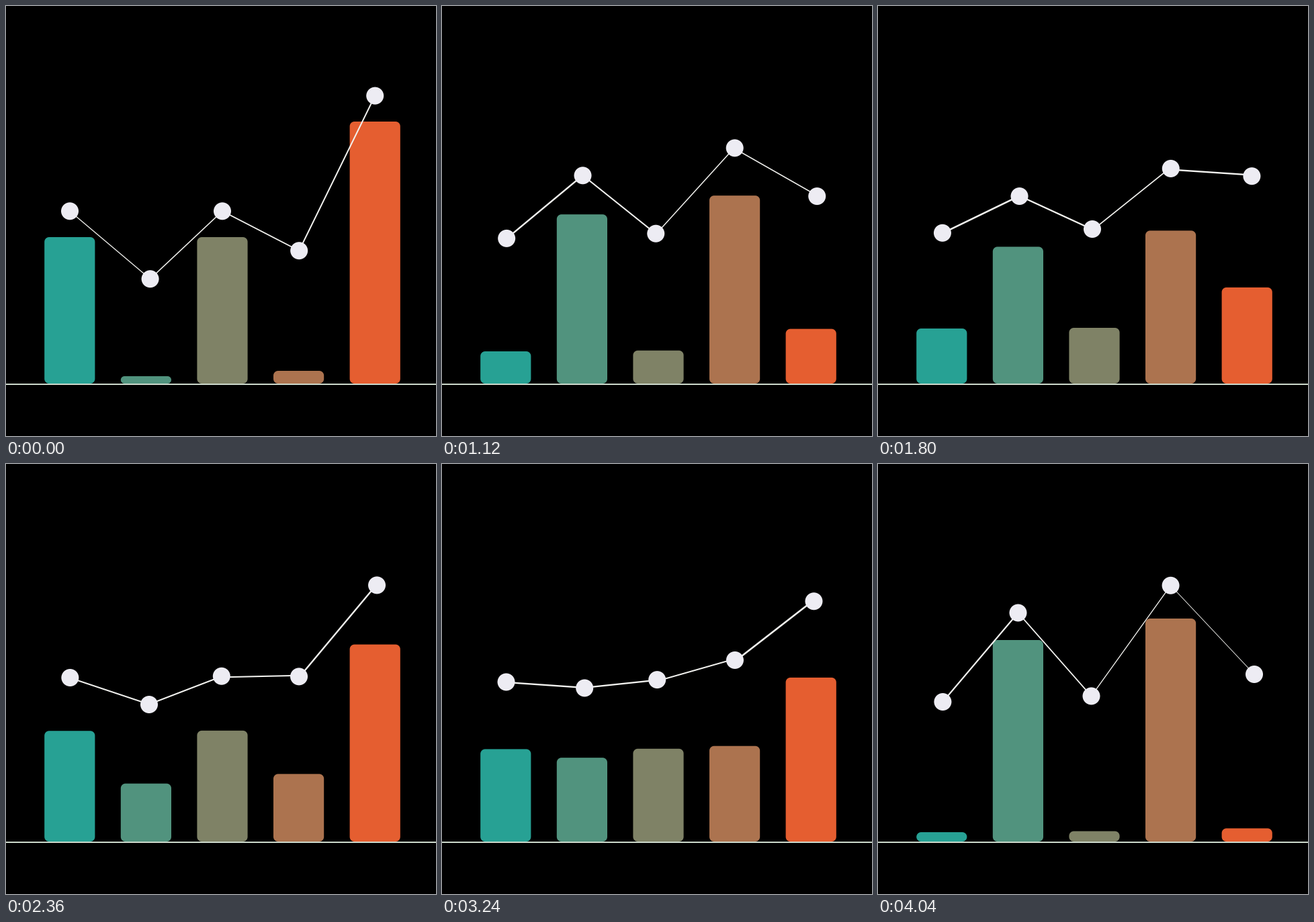
A matplotlib script that plays this animation: 640x640 px, repeating every 4140 ms.

```python
import numpy as np
import matplotlib.pyplot as plt
from matplotlib.animation import FuncAnimation
from matplotlib.patches import Circle, Polygon, Rectangle

SIZE, DPI = 640, 100
STEP_MS, FRAMES = 20, 207
FLOOR = 562
BAR_LEFT, BAR_PITCH, BAR_WIDTH, CORNER = 57.2, 113.6, 75.2, 7
DOT_RADIUS, LINK_GAP = 13, 11
BAR_COLORS = ["#27a194", "#51937e", "#7f8266", "#ac734f", "#e55e30"]

# Two key poses; everything moves in a straight line between them.
HEIGHTS = np.array([[218, 11, 218, 19, 390],
                    [14, 300, 15.5, 332, 19.7]])
DOTS = np.array([
    [(95, 305.3), (214.6, 406.2), (322, 305.3), (436.2, 364.2), (549.2, 133.6)],
    [(96.4, 354), (208.5, 221.5), (317.5, 345.4), (435.6, 180.8), (560, 313)],
])
# Link weight runs from thin to full in one pose, full to thin in the other.
WEIGHTS = np.linspace((1.3, 2.2), (2.0, 0.9), 4).T


def progress(i):
    """Linear swing: there, slightly slower back, there again, short rest."""
    return np.interp(i, [1, 67, 136, 202], [0, 1, 0, 1])


def blend(poses, p):
    return poses[0] + (poses[1] - poses[0]) * p


def bar_outline(n, height):
    """Rounded rectangle standing on the floor, one arc per corner."""
    r = min(CORNER, height / 2)
    left = BAR_LEFT + n * BAR_PITCH
    xs = left + BAR_WIDTH - r, left + r
    ys = FLOOR - r, FLOOR - height + r
    points = []
    for k, (x, y) in enumerate([(xs[0], ys[0]), (xs[1], ys[0]),
                                (xs[1], ys[1]), (xs[0], ys[1])]):
        a = np.linspace(k, k + 1, 9) * np.pi / 2
        points.append(np.column_stack([x + r * np.cos(a), y + r * np.sin(a)]))
    return np.concatenate(points)


def link_quads(dots, weights):
    """Thin quads joining neighbouring dots, stopping just inside their rims."""
    start, end = dots[:-1], dots[1:]
    along = end - start
    along /= np.linalg.norm(along, axis=1, keepdims=True)
    start, end = start + LINK_GAP * along, end - LINK_GAP * along
    # Upright ends keep the weight even once divided by the slope's cosine.
    half = np.zeros_like(along)
    half[:, 1] = weights / (2 * along[:, 0])
    return np.stack([start - half, end - half, end + half, start + half], axis=1)


LINKS = np.array([link_quads(d, w) for d, w in zip(DOTS, WEIGHTS)])

fig = plt.figure(figsize=(SIZE / DPI, SIZE / DPI), dpi=DPI, facecolor="black")
ax = fig.add_axes([0, 0, 1, 1])
ax.set(xlim=(0, SIZE), ylim=(SIZE, 0))
ax.axis("off")

floor = Rectangle((0, FLOOR), SIZE, 2, fc="#cdd9cc", lw=0)
bars = [Polygon(bar_outline(n, h), fc=color, lw=0, snap=False)
        for n, (h, color) in enumerate(zip(HEIGHTS[0], BAR_COLORS))]
links = [Polygon(quad, fc="#f2f2ef", lw=0, snap=False) for quad in LINKS[0]]
dots = [Circle(xy, DOT_RADIUS, fc="#edecf3", lw=0, snap=False) for xy in DOTS[0]]

for z, part in enumerate([floor, *bars, *links, *dots]):
    part.set_zorder(z)
    ax.add_patch(part)


def draw(i):
    p = progress(i)
    for n, (bar, height) in enumerate(zip(bars, blend(HEIGHTS, p))):
        bar.set_xy(bar_outline(n, height))
    for link, quad in zip(links, blend(LINKS, p)):
        link.set_xy(quad)
    for dot, xy in zip(dots, blend(DOTS, p)):
        dot.center = tuple(xy)
    return bars + links + dots


anim = FuncAnimation(fig, draw, frames=FRAMES, interval=STEP_MS,
                     repeat=True, repeat_delay=0, blit=False)
plt.show()
```
